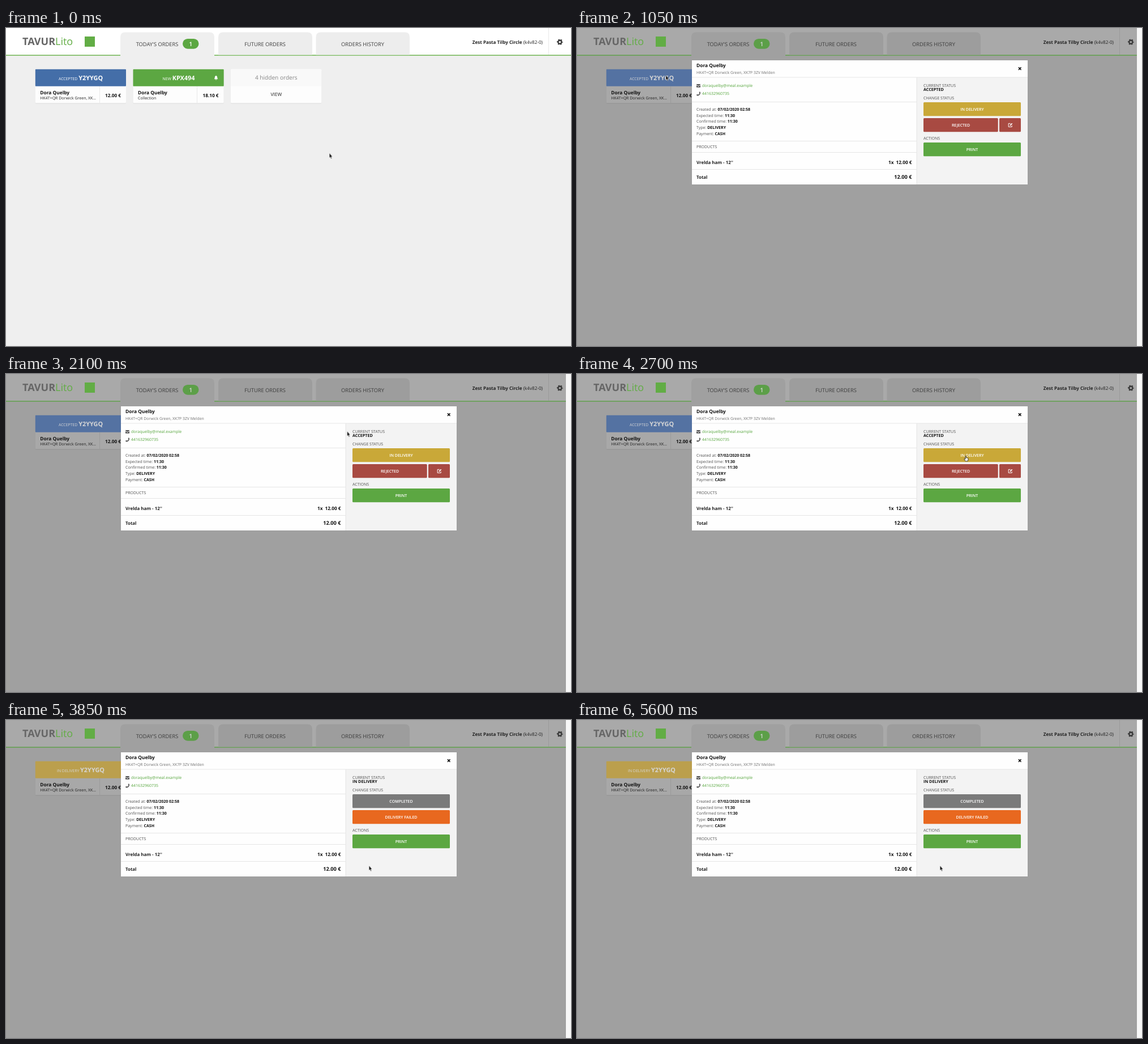
An HTML page for the animation above (5650 ms loop, 998 px wide and 561 px high).

```html
<!DOCTYPE html>
<html lang="en">
<head>
<meta charset="utf-8">
<title>Orders</title>
<style>
html, body { margin: 0; width: 100%; height: 100%; overflow: hidden; background: #efefef; }
svg { display: block; width: 100%; height: 100%; animation: shade 5650ms step-end infinite; }
text { font-family: "Open Sans", "Noto Sans", sans-serif; font-size: 7px; fill: #222; text-rendering: geometricPrecision; white-space: pre; }
.b { font-weight: 700; }
.mid { text-anchor: middle; }
.end { text-anchor: end; }
.tab { font-size: 9.3px; fill: #3c3c3c; }
.name { font-size: 8.4px; fill: #111; }
.price { font-size: 8.25px; fill: #111; }
.state { font-size: 6.9px; font-weight: 500; text-anchor: middle; }
.code { font-size: 10.9px; font-weight: 700; }
.on { fill: var(--on); }
.head { fill: var(--head); }
.bg { fill: var(--bg); }
.tabs { fill: var(--tab); }
.card { fill: var(--card); }
.green { fill: var(--green); }
.blue { fill: var(--blue); }
.gold { fill: var(--gold); }
.rule { stroke: var(--rule); }
.btn { font-size: 7px; font-weight: 600; fill: #fff; text-anchor: middle; }
.label { fill: #505050; }
.strong { font-weight: 700; fill: #111; }
.link { fill: #55a53c; }
.modal, .before, .after, .arrow, .hand { animation: 5650ms step-end infinite; }
.modal { animation-name: open; }
.before { animation-name: before; }
.after { animation-name: after; }
.arrow { animation-name: arrow; }
.hand { animation-name: hand; }
.cursor { animation: move 5650ms infinite; }

@keyframes shade {
  from, to {
    --bg: #efefef; --head: #fff; --tab: #ededed; --card: #fdfdfd; --rule: #e9e9e9; --on: #fff;
    --green: #5ca742; --blue: #446ea8; --gold: #c9a838; --line: #64b045; --shadow: #dcdcdc;
  }
  18.5% {
    --bg: #a0a0a0; --head: #a9a9a9; --tab: #9d9d9d; --card: #a8a8a8; --rule: #9a9a9a; --on: #d6d6d6;
    --green: #5c9f48; --blue: #5472a2; --gold: #bb9f4d; --line: #5ca046; --shadow: #929292;
  }
}
@keyframes open { from, to { visibility: hidden; } 18.5% { visibility: visible; } }
@keyframes before { from, to { opacity: 1; } 65.4% { opacity: 0; } }
@keyframes after { from, to { opacity: 0; } 65.4% { opacity: 1; } }
@keyframes arrow { from, to { opacity: 1; } 41.5% { opacity: 0; } 61.2% { opacity: 1; } }
@keyframes hand { from, to { opacity: 0; } 41.5% { opacity: 1; } 61.2% { opacity: 0; } }
@keyframes move {
  0%, .8% { transform: translate(571.3px, 220.8px); animation-timing-function: ease-in-out; }
  9.7%, 32.7% { transform: translate(157px, 83.5px); animation-timing-function: ease-in-out; }
  37.17% { transform: translate(602.3px, 101px); animation-timing-function: ease-out; }
  43.5% { transform: translate(681px, 138px); animation-timing-function: ease-in-out; }
  48%, 60.2% { transform: translate(687px, 144.5px); animation-timing-function: ease-in-out; }
  64.5%, 100% { transform: translate(641.3px, 257px); }
}
</style>
</head>
<body>
<svg viewBox="0 0 998 561" preserveAspectRatio="none">
  <rect class="bg" width="998" height="561"/>

  <!-- Header -->
  <rect class="head" width="998" height="48"/>
  <rect y="47.4" width="998" height="1.4" fill="var(--line)"/>
  <path class="bg" d="M202 50V16q0-8.5 8.5-8.5h149q8.5 0 8.5 8.5V50z"/>
  <path class="tabs" d="M375 47.4V16q0-8.5 8.5-8.5h149q8.5 0 8.500 8.5V47.4z"/>
  <path class="tabs" d="M547.5 47.4V16q0-8.5 8.5-8.5h148.5q8.5 0 8.5 8.5V47.4z"/>
  <text x="29" y="30" style="font-size:18px;fill:#666"><tspan class="b">TAVUR</tspan><tspan style="fill:#62ad45">Lito</tspan></text>
  <rect x="139" y="15" width="18" height="18" fill="#62ad45"/>
  <text class="tab mid" x="267" y="31.7">TODAY'S ORDERS</text>
  <text class="tab mid" x="457.5" y="31.7">FUTURE ORDERS</text>
  <text class="tab mid" x="630" y="31.7">ORDERS HISTORY</text>
  <rect class="green" x="312" y="19" width="28.5" height="17.7" rx="8.85"/>
  <text class="on mid" x="326.2" y="31.8" style="font-size:10.5px;font-weight:600">1</text>
  <text class="end" x="948" y="28" style="font-size:8.15px"><tspan class="b">Zest Pasta Tilby Circle</tspan> (k4v82-0)</text>
  <path class="rule" d="M958.5 0V47"/>
  <g fill="none" stroke="#3a3a3a" transform="translate(978.3 24.7)">
    <circle r="3" stroke-width="2.4"/>
    <circle r="4.6" stroke-width="1.4" stroke-dasharray="2.4 2.417" stroke-dashoffset="1.2"/>
  </g>

  <!-- Order cards -->
  <g fill="var(--shadow)">
    <rect x="51.8" y="74" width="160.2" height="59.6" rx="1.5"/>
    <rect x="224.5" y="74" width="160.2" height="59.6" rx="1.5"/>
    <rect x="397" y="74" width="160.2" height="59.6" rx="1.5"/>
  </g>
  <g class="card">
    <rect x="51.8" y="72.8" width="160.2" height="59.8" rx="1.5"/>
    <rect x="224.5" y="72.8" width="160.2" height="59.8" rx="1.5"/>
    <rect x="397" y="72.8" width="160.2" height="59.8" rx="1.5"/>
  </g>
  <path class="rule" d="M165.5 103V132.5M337.5 103V132.5"/>
  <g class="before">
    <rect class="blue" x="51.8" y="72.8" width="160.2" height="29.9" rx="1"/>
    <text class="on state" x="132" y="91.5">ACCEPTED <tspan class="code">Y2YYGQ</tspan></text>
  </g>
  <g class="after">
    <rect class="gold" x="51.8" y="72.8" width="160.2" height="29.9" rx="1"/>
    <text class="on state" x="132" y="91.5">IN DELIVERY <tspan class="code">Y2YYGQ</tspan></text>
  </g>
  <text class="name b" x="60.3" y="117">Dora Quelby</text>
  <text x="60.3" y="125.5">HK4T+QR Dorwick Green, XK...</text>
  <text class="price b mid" x="189" y="122">12.00 €</text>

  <rect class="green" x="224.5" y="72.8" width="160.2" height="29.9" rx="1"/>
  <text class="on state" x="305" y="91.5">NEW <tspan class="code">KPX494</tspan></text>
  <path class="on" d="M367.6 90.2q1.2-.9 1.2-3.3 0-2.2 1.7-2.5 0-.7.5-.7t.5.7q1.7.3 1.7 2.5 0 2.4 1.2 3.3zM370 90.700h2q0 1-1 1t-1-1z"/>
  <text class="name b" x="233" y="117">Dora Quelby</text>
  <text x="233" y="125.5">Collection</text>
  <text class="price b mid" x="361.5" y="122">18.10 €</text>

  <rect x="397" y="72.8" width="160.2" height="29.9" rx="1" fill="#f9f9f9"/>
  <text class="mid" x="477.3" y="91.2" style="font-size:10.1px;fill:#858585">4 hidden orders</text>
  <text class="mid" x="477.3" y="120" style="font-size:8.4px;font-weight:500">VIEW</text>

  <!-- Order details -->
  <g class="modal">
    <rect x="989" width="9" height="561" fill="#f7f7f7"/>
    <rect x="203" y="57" width="593" height="219" fill="#fefefe"/>
    <rect x="600" y="87" width="196" height="189" fill="#f3f3f3"/>
    <path d="M203 87H796M203 130.5H600M203 199.5H600M203 219.5H600M203 249.5H600M600 87V276" stroke="#e6e6e6"/>
    <text class="name b" x="211" y="69.3">Dora Quelby</text>
    <text x="211" y="81.2" style="font-size:6.87px;fill:#707070">HK4T+QR Dorwick Green, XK7P 3ZV Melden</text>
    <path d="M779.9 69.4l4.6 4.6m0-4.6l-4.6 4.6" stroke="#111" stroke-width="1.6"/>

    <path d="M211 99h7v.9l-3.5 2.3-3.5-2.3zM211 100.9l3.5 2.3 3.5-2.3V104.8h-7z" fill="#555"/>
    <path d="M217 113.2q.8 2.3-1.1 4.2t-4.2 1.1" fill="none" stroke="#555" stroke-width="1.5"/>
    <path d="M215.6 112.8l1.8-.2.3 2-1.4.4zM211.2 117.6l1.9-.8.6 1.3-1.9 1z" fill="#555"/>
    <text class="link" x="221" y="103.9">doraquelby@meal.example</text>
    <text class="link" x="221" y="118.3">441632960735</text>

    <text class="label" x="211" y="145.7">Created at: <tspan class="strong">07/02/2020 02:58</tspan></text>
    <text class="label" x="211" y="156.6">Expected time: <tspan class="strong">11:30</tspan></text>
    <text class="label" x="211" y="167.4">Confirmed time: <tspan class="strong">11:30</tspan></text>
    <text class="label" x="211" y="178.2">Type: <tspan class="strong">DELIVERY</tspan></text>
    <text class="label" x="211" y="189">Payment: <tspan class="strong">CASH</tspan></text>
    <text class="label" x="211" y="212.3">PRODUCTS</text>
    <text class="b" x="211" y="240.2" style="font-size:7.9px">Vrelda ham - 12''</text>
    <text class="price b end" x="559.5" y="240.2">1x</text>
    <text class="price b end" x="591.5" y="240.2">12.00 €</text>
    <text class="b" x="211" y="266" style="font-size:7.9px">Total</text>
    <text class="b end" x="591.5" y="266.4" style="font-size:9.2px;fill:#111">12.00 €</text>

    <text class="label" x="612" y="103.6">CURRENT STATUS</text>
    <text class="label" x="612" y="126.2">CHANGE STATUS</text>
    <text class="label" x="612" y="197.4">ACTIONS</text>
    <g class="before">
      <text class="strong" x="612" y="111.2" style="font-size:7.2px">ACCEPTED</text>
      <rect x="612" y="131" width="172" height="24.3" rx="1.5" fill="#c9a838"/>
      <text class="btn" x="698" y="145.7">IN DELIVERY</text>
      <rect x="612" y="159" width="131.7" height="24.3" rx="1.5" fill="#a84a42"/>
      <text class="btn" x="678" y="173.7">REJECTED</text>
      <rect x="746" y="159" width="38" height="24.3" rx="1.5" fill="#a84a42"/>
      <g fill="none" stroke="#fff">
        <path d="M765.8 168.4h-3.6v6h6v-2.4"/>
        <path d="M764.8 172.1l3.8-3.8" stroke-width="1.7"/>
      </g>
    </g>
    <g class="after">
      <text class="strong" x="612" y="111.2" style="font-size:7.2px">IN DELIVERY</text>
      <rect x="612" y="131" width="172" height="24.3" rx="1.5" fill="#7a7a7a"/>
      <text class="btn" x="698" y="145.7">COMPLETED</text>
      <rect x="612" y="159" width="172" height="24.3" rx="1.5" fill="#e8681f"/>
      <text class="btn" x="698" y="173.7">DELIVERY FAILED</text>
    </g>
    <rect x="612" y="202" width="172" height="24.3" rx="1.5" fill="#5ca742"/>
    <text class="btn" x="698" y="216.7">PRINT</text>
  </g>

  <!-- Pointer -->
  <g class="cursor" stroke-width=".4" stroke-linejoin="round">
    <path class="arrow" d="M0 0V8.3L1.7 6.7 2.9 9.8 4.2 9.3 2.9 6.3H5.2z" fill="#111" stroke="#fff"/>
    <path class="hand" d="M-.9 5.6V.8q0-.8.7-.8t.7.8V3.2q1-.5 1.2.3 1-.4 1.2.4 1-.2 1 .8v2L3 9.2H-.9L-3 5.900q-.3-.9.5-1z" fill="#fff" stroke="#111" stroke-width=".8"/>
  </g>
</svg>
</body>
</html>
```
